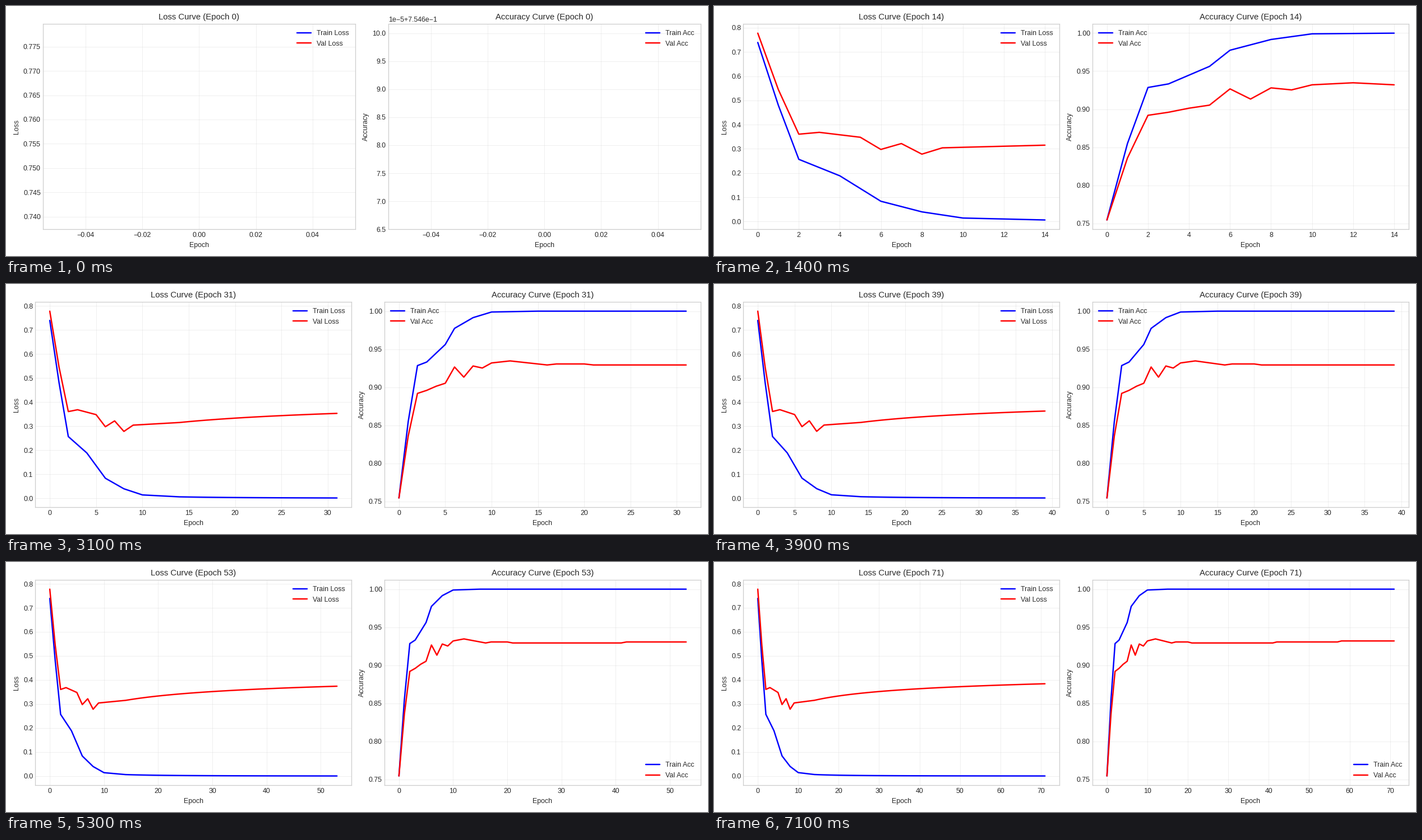
Animation of 1252x447 px, one loop 7.2 s. Source, as a matplotlib script:

```python
import numpy as np
import matplotlib.pyplot as plt
from matplotlib.animation import FuncAnimation

W, H, DPI = 1252, 447, 1252 / 14
EPOCHS = 72
SETTLED = 14      # from here on the losses follow smooth power laws
VAL_SIZE = 750    # validation accuracy moves in steps of one answer

plt.style.use("seaborn-v0_8-whitegrid")
plt.rcParams.update({
    "font.family": "Liberation Sans",
    "axes.labelpad": 4.4,
    "xtick.major.pad": 3.9,
    "legend.labelspacing": 0.54,
})

epochs = np.arange(EPOCHS)
ratio = SETTLED / np.maximum(epochs, SETTLED)


def through(points):
    """Straight segments through {epoch: value} key points."""
    return np.interp(epochs, list(points), list(points.values()))


train_loss = through({0: .7393, 1: .4807, 2: .2569, 4: .1888, 6: .0838,
                      8: .04, 10: .0145, 14: .0065}) * ratio ** 1.6

val_loss = through({0: .7778, 1: .5454, 2: .3607, 3: .3683, 5: .348, 6: .2977,
                    7: .322, 8: .2783, 9: .3044, 14: .3153})
val_loss += .1787 * (1 - ratio ** .3)

train_acc = through({0: .7547, 1: .855, 2: .9285, 3: .9332, 5: .9562,
                     6: .9774, 8: .9915, 10: .9989, 15: 1})

val_hits = through({0: 566, 1: 627, 2: 669, 5: 679, 6: 695, 7: 685, 8: 696,
                    9: 694, 10: 699, 12: 701, 16: 697, 18: 698, 23: 697,
                    33.5: 697, 65.5: 699})
val_acc = np.round(val_hits) / VAL_SIZE

# The tiny offset keeps the pixel size from truncating downwards
fig, (ax_loss, ax_acc) = plt.subplots(
    1, 2, figsize=((W + 1e-6) / DPI, (H + 1e-6) / DPI), dpi=DPI)


def draw_curves(ax, epoch, name, short, train, val):
    ax.clear()
    x = epochs[:epoch + 1]
    ax.plot(x, train[:epoch + 1], "b-", lw=2, label=f"Train {short}")
    ax.plot(x, val[:epoch + 1], "r-", lw=2, label=f"Val {short}")
    ax.set_title(f"{name} Curve (Epoch {epoch})")
    ax.set_xlabel("Epoch")
    ax.set_ylabel(name)
    ax.legend()
    ax.grid(True, alpha=0.3)


def update(epoch):
    draw_curves(ax_loss, epoch, "Loss", "Loss", train_loss, val_loss)
    draw_curves(ax_acc, epoch, "Accuracy", "Acc", train_acc, val_acc)
    fig.tight_layout()


anim = FuncAnimation(fig, update, frames=EPOCHS, interval=100, repeat=True)
plt.show()
```
